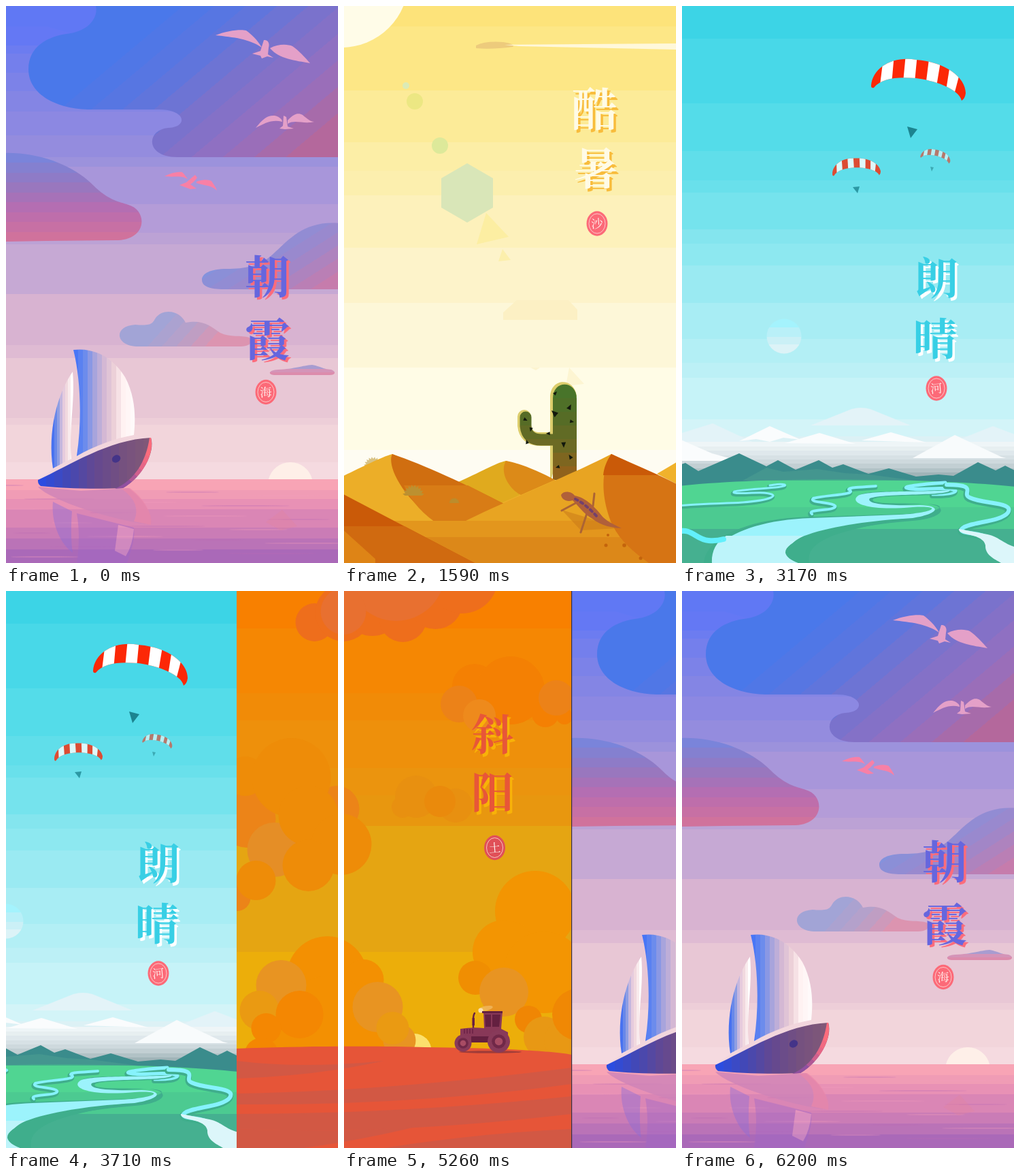
Recreate the animation shown at these times as an HTML page. Size 488 by 818 pixels, loop 6.51 s.

```html
<!DOCTYPE html>
<html lang="zh">
<head>
<meta charset="utf-8">
<title>朝霞 酷暑 朗晴 斜阳</title>
<style>
html, body { margin: 0; width: 100%; height: 100%; overflow: hidden; background: #332a3c; }
svg { display: block; width: 100vw; height: 100vh; }
text { font-family: "Noto Serif CJK SC", "Noto Sans CJK SC", "Noto Sans CJK", serif; text-anchor: middle; }
</style>
</head>
<body>
<svg id="stage" viewBox="0 0 488 818"></svg>
<script>
const WIDTH = 494, REST = 3.5, LOOP = 6510;

// ---------- drawing helpers ----------
const path = (d, fill, extra = '') => `<path d="${d}" fill="${fill}" ${extra}/>`;
const poly = (points, fill, extra = '') => `<polygon points="${points}" fill="${fill}" ${extra}/>`;
const rect = (x, y, w, h, fill) => `<rect x="${x}" y="${y}" width="${w}" height="${h}" fill="${fill}"/>`;
const oval = (x, y, rx, ry, fill, extra = '') =>
  `<ellipse cx="${x}" cy="${y}" rx="${rx}" ry="${ry}" fill="${fill}" ${extra}/>`;
const dot = (x, y, r, fill) => oval(x, y, r, r, fill);
const dots = (fill, list) => list.map(([x, y, r]) => dot(x, y, r, fill)).join('');
const line = (d, color, width, extra = '') =>
  `<path d="${d}" fill="none" stroke="${color}" stroke-width="${width}" stroke-linecap="round" ${extra}/>`;
const shift = (x, body) => `<g transform="translate(${x})">${body}</g>`;

// Flat horizontal stripes: each entry is [top, colour] and reaches down to the next.
const bands = (x, list, bottom) => list.map(([y, color], i) =>
  rect(x, y, WIDTH, (i + 1 < list.length ? list[i + 1][0] : bottom) - y, color)).join('');

function mix(colors, t) {
  const p = t * (colors.length - 1), i = Math.min(Math.floor(p), colors.length - 2);
  const channel = (c, k) => parseInt(c.slice(1 + 2 * k, 3 + 2 * k), 16);
  return `rgb(${[0, 1, 2].map(k => Math.round(
    channel(colors[i], k) + (channel(colors[i + 1], k) - channel(colors[i], k)) * (p - i)))})`;
}

// Linear gradient made of n hard steps.
function stepped(id, [x1, y1, x2, y2], colors, n) {
  let stops = '';
  for (let i = 0; i < n; i++) {
    const c = mix(colors, i / (n - 1));
    stops += `<stop offset="${i / n}" stop-color="${c}"/><stop offset="${(i + 1) / n}" stop-color="${c}"/>`;
  }
  return `<linearGradient id="${id}" gradientUnits="userSpaceOnUse" x1="${x1}" y1="${y1}" x2="${x2}" y2="${y2}">${stops}</linearGradient>`;
}

function glyph(char, x, y, size, color, shadow) {
  const at = (d, fill) => `<text x="${x + d}" y="${y + d + size * .375}" font-size="${size}" font-weight="900" fill="${fill}">${char}</text>`;
  return at(3.5, shadow) + at(0, color);
}

const seal = (char, x, y, color = '#fc6a78') =>
  oval(x, y, 15.5, 18.2, color) +
  oval(x, y, 12, 14.5, 'none', 'stroke="#fde0dc" stroke-width=".8"') +
  `<text x="${x}" y="${y + 6.5}" font-size="17.5" font-weight="300" fill="#fff4f0" transform="rotate(-5 ${x} ${y})">${char}</text>`;

// ---------- dawn at sea ----------
function dawn() {
  const sky = [[0, '#6478f4'], [58, '#6c7cf0'], [70, '#747fec'], [98, '#7c82e8'], [125, '#8485e4'],
    [155, '#8c88e2'], [190, '#948cde'], [222, '#9c92dc'], [236, '#a896da'], [291, '#b49cd8'],
    [333, '#bca2d5'], [350, '#c6a9d4'], [423, '#d8b3d1'], [498, '#dfbbd3'], [517, '#e8c7d5'],
    [605, '#edced8'], [615, '#f2d5db'], [670, '#f5dae0']];
  const sea = [[695, '#f8a4b5'], [711, '#f09cb5'], [724, '#e891b5'], [739, '#da86b5'],
    [766, '#ca7cb6'], [782, '#ba73b7'], [798, '#aa69b8']];
  const defs =
    stepped('cloudA', [190, 20, 400, 270], ['#4a78ea', '#5a76e0', '#7a72cc', '#9470c0', '#b4689c'], 11) +
    stepped('cloudB', [0, 216, 0, 346], ['#7a84da', '#9478c0', '#b86cb0', '#d0729c'], 9) +
    stepped('cloudC', [370, 330, 440, 440], ['#8492dc', '#9c88cc', '#c67cac'], 8) +
    stepped('cloudD', [230, 452, 300, 515], ['#a2a4d6', '#b8a0c8', '#dc94b0'], 6) +
    stepped('cloudE', [0, 528, 0, 543], ['#a89cd0', '#d494b8', '#dc8cac'], 3) +
    stepped('hull', [47, 0, 214, 0], ['#2c4ce0', '#4448b4', '#644890', '#745080', '#805878'], 14) +
    stepped('bow', [176, 706, 212, 650], ['#9050a0', '#e06488', '#fc6c7c'], 6) +
    stepped('sail', [99, 0, 190, 0], ['#4876f6', '#6c8cec', '#a8a4dc', '#d4b8d4', '#ecd0d8', '#fff2f2', '#fffafa'], 13) +
    stepped('jib', [67, 0, 99, 0], ['#4872f0', '#8098e4', '#e0c4dc', '#f4dce0', '#ffffff'], 8);

  const clouds =
    path('M132 0C136 18 120 36 95 40C60 44 33 60 33 93C33 130 75 152 125 152H225C265 152 268 178 238 179C206 182 204 222 252 222H492V0Z', 'url(#cloudA)') +
    path('M-5 216C50 214 100 235 128 263C150 285 165 287 180 292C208 300 208 342 165 344L60 345L-5 346Z', 'url(#cloudB)') +
    path('M492 319C440 314 417 342 397 360C375 383 350 386 325 386C300 386 288 393 288 402C288 412 300 416 320 416H492Z', 'url(#cloudC)') +
    path('M195 500C160 500 157 470 190 468C215 470 215 466 220 458C230 444 255 446 264 465C290 460 300 470 315 480C330 487 345 483 358 487C362 494 360 499 345 500Z', 'url(#cloudD)') +
    path('M394 542C385 541 385 535 400 534C425 533 435 528 450 527C465 530 465 533 478 534C486 537 484 542 476 542Z', 'url(#cloudE)');

  const birds =
    path('M308 43C325 36 345 34 353 36C360 41 370 50 376 61C357 48 335 46 308 43ZM379 50C385 49 388 55 386 61L385 71L393 76L384 74L376 77L374 73L362 70L374 66ZM388 62C400 55 415 56 421 59C430 65 440 76 447 84C425 80 402 78 388 62Z', '#e4a0c8') +
    path('M367 179C378 165 385 160 395 161C403 163 406 167 406 170C392 166 380 172 367 179ZM408 161L412 163L414 177L423 180L410 181L402 180L407 176ZM414 168C424 157 430 157 436 160C443 166 448 170 453 170C437 174 425 166 414 173Z', '#e4a0c8') +
    path('M233 250C243 245 252 243 259 244C263 248 265 251 267 254C256 248 248 252 233 250ZM278 248L281 252Q276 259 271 262L280 268L271 269L255 263L265 259ZM280 258C290 254 297 255 302 257C306 263 309 267 310 271C302 263 292 264 280 260Z', '#f880a6');

  const reflection = `<g opacity=".42">` +
    path('M69 728L97 742C95 770 96 790 98 803C80 790 66 760 69 728Z', '#8c6cd8') +
    path('M104 745L188 766C190 782 184 800 178 818H104Q110 780 104 745Z', '#a068c8') +
    path('M165 762L188 768Q186 792 176 808L160 800Z', '#f0a8cc') + '</g>' +
    path('M47 706C60 722 140 752 213 762C216 746 200 722 180 708L110 712Z', '#cf84b8', 'opacity=".8"') +
    path('M170 709L182 708C202 722 216 746 213 762L188 757Q200 730 170 709Z', '#ec88a8', 'opacity=".7"');

  let ripples = '';
  for (let i = 0; i < 22; i++) {
    const y = 704 + i * 5, x = (i * 137) % 470;
    ripples += oval(x, y, 26 + (i * 29) % 45, 1, i % 2 ? '#f09cb8' : '#b86cb4', 'opacity=".3"');
  }

  const boat =
    path('M52 692C95 662 150 637 188 630L213 634L130 672Z', '#f2d6dd') +
    path('M98 537C75 570 61 625 69 679L96 665C92 620 102 580 98 537Z', 'url(#jib)') +
    path('M99 505C130 501 158 517 175 545C192 577 190 610 188 630C160 635 130 646 104 661C113 600 108 540 99 505Z', 'url(#sail)') +
    path('M47 696C95 674 150 637 213 634C220 655 200 692 172 708C130 710 80 708 51 705Q46 701 47 696Z', 'url(#hull)') +
    path('M213 634C219 658 200 692 172 708L160 709C190 696 206 668 211 634Z', 'url(#bow)') +
    oval(162, 665, 6.5, 5.3, '#443488', 'transform="rotate(-30 162 665)"');

  return `<defs>${defs}</defs>` + shift(4,
    bands(-4, sky, 695) + path('M-5 0H132C136 18 120 36 95 40L60 30H-5Z', '#5c78f4', 'opacity=".45"') +
    clouds + birds + path('M386 695A33 33 0 0 1 450 695Z', '#feefe8') + bands(-4, sea, 818) +
    ripples + poly('382,758 406,740 428,764 404,770', '#e48098', 'opacity=".3"') +
    reflection + boat +
    glyph('朝', 384, 397, 66, '#6666de', '#fc6c7c') + glyph('霞', 384, 489, 66, '#6666de', '#fc6c7c') +
    seal('海', 382, 567));
}

// ---------- desert heat ----------
function bush(x, y, r, color) {
  let points = '';
  for (let i = 0; i <= 20; i++) {
    const a = Math.PI * (1 + i / 20), k = i % 2 ? r : r * .78;
    points += `${x + k * Math.cos(a)},${y + k * Math.sin(a)} `;
  }
  return poly(points, color);
}

function desert() {
  const sky = [[0, '#fde37a'], [30, '#fde786'], [124, '#fceb98'], [200, '#fceea6'], [242, '#fcefae'],
    [278, '#fdf1bb'], [355, '#fdf3ca'], [436, '#fdf7d8'], [531, '#fffce6'], [652, '#fefcf2']];
  const spikes = [[112, 599, 5], [133, 590, 4], [136, 610, 3], [125, 643, 4], [117, 677, 3], [135, 663, 3.5],
    [112, 569, 3], [68, 607, 3], [77, 621, 3], [103, 628, 3], [71, 641, 3]];
  const arm = 'M69 604V617Q71 637 92 637H114';

  const flares = dot(310, 117, 5, '#dcebb6') + dot(323, 140, 12, '#ece783') + dot(360, 205, 12, '#dde99a') +
    poly('400,231 438,253 438,296 400,318 362,296 362,253', '#d9e6b8') +
    poly('428,304 461,339 414,350', '#fceea2') + poly('452,357 464,373 446,375', '#fcefac');

  const dunes =
    bush(-155, 676, 14, '#d8c284') +
    path('M-203 692C-175 679 -145 663 -127 658C-80 678 -20 704 0 712L40 668C60 674 90 690 112 696L300 818H-203Z', '#ecae28') +
    path('M-30 699C0 686 25 671 40 668L60 718L10 740Z', '#e0aa1e') +
    path('M40 668C30 685 45 710 62 718L112 696C90 684 60 671 40 668Z', '#dc8a18') +
    path('M-127 658C-135 672 -118 722 -45 770C-20 757 20 742 39 732C-20 702 -80 674 -127 658Z', '#d06e10') +
    path('M-110 704H-16L39 732L-45 770Q-92 744 -110 704Z', '#d87c16') +
    path('M-45 770C10 738 130 692 195 658L291 710V818H-203V760Z', '#e8a422') +
    rect(-203, 756, 494, 24, '#e3961d') + rect(-203, 780, 494, 38, '#dc8819') +
    path('M-203 715L-6 818H-203Z', '#ca5a08') + path('M-203 764H-109L-6 818H-203Z', '#d06a10') +
    path('M-203 766L-152 812V818H-203Z', '#de8416') +
    poly('262,687 291,670 291,702', '#f0b22c') +
    path('M195 658C184 675 178 705 190 745C200 780 225 800 250 818H291V702C260 686 230 674 195 658Z', '#d67414') +
    path('M195 658C188 668 184 678 183 689H264C240 678 220 670 195 658Z', '#ca5a08') +
    bush(-96, 719, 16, '#bc9030') + bush(-36, 730, 8, '#bc8c2c');

  const lizard =
    path('M122 740Q165 752 205 767L150 770Z', '#c87818', 'opacity=".5"') +
    line('M150 726L122 741M160 742L150 773M168 734L170 716M176 746L190 762', '#ac6434', 3) +
    path('M121 718C125 711 137 713 141 719C158 722 172 737 182 750C190 758 200 762 210 767C192 766 178 762 167 753C154 746 146 733 138 726C130 729 122 725 121 718Z', '#b0603a') +
    line('M142 724Q158 732 174 750', '#74406c', 4, 'stroke-dasharray="4 5"');

  const steps = dots('#c4640c', [[187, 792, 2.5], [214, 792, 2.8], [238, 811, 2.5], [190, 777, 2]]);

  const cactus =
    path('M105 700V575C105 545 141 545 144 573L135 600Z', '#dccd6c') +
    line(arm, '#dccd6c', 20, 'transform="translate(-2 -1)"') +
    `<g stroke="url(#cactus)">${line(arm, 'url(#cactus)', 17)}</g>` +
    path('M109 696V576C109 549 144 549 144 577V696Z', 'url(#cactus)') +
    spikes.map(([x, y, r], i) =>
      poly(`${-r},${-r} ${r},${-r * .3} ${-r * .1},${r}`, '#12180c', `transform="translate(${x} ${y}) rotate(${i * 75})"`)).join('');

  return `<defs>${stepped('cactus', [0, 556, 0, 696], ['#48742a', '#566c26', '#6c6a24', '#90621c'], 7)}</defs>` +
    bands(0, sky, 818) + dot(1, -38, 99, '#fffce8') + shift(-214, flares) + shift(203,
    path('M-4 58Q10 51 36 53Q55 56 50 60Q20 64 -4 62Z', '#edcb7c') +
    poly('38,57 291,55 291,64 60,59', '#fff8da') +
    poly('36,450 56,432 132,432 145,446 145,461 36,461', '#fcf0c4') +
    poly('133,531 155,555 128,558', '#fdf5d2') + poly('76,531 90,531 84,535', '#fcf4d0') +
    cactus + dunes + lizard + steps +
    glyph('酷', 170, 151, 67, '#fffbe6', '#f8bc3c') + glyph('暑', 172, 238, 64, '#fffbe6', '#f8bc3c') +
    seal('沙', 174, 319.5));
}

// ---------- clear river plain ----------
function plain() {
  const sky = [[0, '#3cd4e6'], [48, '#48d8e8'], [143, '#54dce9'], [213, '#60deea'], [256, '#69e0eb'],
    [274, '#75e3ed'], [328, '#84e5ee'], [349, '#8de8f0'], [381, '#9aeaf2'], [436, '#a8edf4'],
    [489, '#b3eff5'], [524, '#bcf0f6'], [546, '#c6f3f8'], [607, '#d3f4f8'], [632, '#dcf1f5']];
  const canopy = 'M279 117C281 90 312 73 345 79C388 82 418 105 418 128Q417 136 412 139C408 121 370 109 345 106C315 104 295 106 283 120Q279 121 279 117Z';
  const chute =
    path(canopy, '#fc2806') +
    `<g clip-path="url(#canopy)">` +
    poly('297,76 313,70 309,116 292,116', '#fff') + poly('330,70 347,70 343,112 326,112', '#fff') +
    poly('365,70 382,76 375,118 359,118', '#fff') + poly('396,80 411,92 401,130 389,124', '#fff') + '</g>';
  const copy = (x, y, scale, angle, opacity) =>
    `<g transform="translate(${x} ${y}) rotate(${angle}) scale(${scale}) translate(-348 -106)" opacity="${opacity}">${chute}</g>`;

  const moon = `<g clip-path="url(#moon)">` + rect(125, 459, 52, 13, '#a4f3fd') + rect(125, 472, 52, 14, '#b9f0f8') +
    rect(125, 486, 52, 11, '#cbf0f6') + rect(125, 497, 52, 14, '#dcf3f7') + '</g>';

  const peaks =
    path('M190 616L250 592Q264 588 278 592L337 616Z', '#e3f3f8') +
    poly('-5,629 46,613 115,645 115,690 -5,690', '#e3f3f8') + poly('400,640 458,617 492,630 492,690 400,690', '#e3f3f8') +
    rect(-4, 640, 494, 60, 'url(#mist)') +
    poly('-5,635 45,657 85,668 -5,668', '#fafcfd') + poly('85,639 130,617 176,637 150,634 130,640 110,636', '#fafcfd') +
    poly('152,642 203,627 256,643', '#fafcfd') + poly('265,638 308,626 360,641', '#fafcfd') +
    poly('340,664 402,630 470,662 492,668 492,680 340,680', '#f8fbfc') +
    rect(330, 664, 162, 30, 'url(#mist)') +
    poly('-5,675 6,671 25,683 85,657 125,676 142,667 168,681 202,667 222,678 238,673 275,687 305,679 345,691 378,688 400,690 436,670 462,682 476,675 492,683 492,715 -5,715', '#3a8c8c') +
    poly('90,697 125,678 150,684 200,680 240,686 275,688 345,697', '#44968f');

  const edge = '#3fae8c';
  const stream = (d, width) => line(d, edge, width + 3, 'transform="translate(-1 2)"') + line(d, '#86f2fc', width);
  const rivers =
    stream('M-5 734C40 730 60 731 90 729C130 726 150 718 122 715C105 714 70 718 78 713C90 709 160 708 152 703C145 701 138 703 130 704', 3) +
    stream('M192 746C182 738 230 742 226 734C222 728 186 730 194 723C210 718 262 718 246 710C245 707 270 706 286 705', 4) +
    stream('M388 700C300 706 330 711 365 709C420 706 410 718 370 717', 5) +
    path('M33 818C36 780 100 750 200 750L330 746C400 742 390 728 340 732C270 738 255 728 262 718C280 710 340 714 400 713C380 722 300 716 282 724C275 732 320 730 355 731C395 732 390 752 340 756C260 762 165 780 180 818Z', edge) +
    path('M45 818C42 785 100 755 190 752L320 747C376 744 384 733 340 736C275 742 245 730 260 719C275 711 350 714 395 711C395 720 300 715 277 723C270 732 310 734 350 733C385 734 378 746 340 752C250 757 150 775 153 803Q155 812 172 818Z', '#9cf3fc') +
    path('M45 818C44 800 52 786 66 778H180C155 790 150 805 172 818Z', '#bdf4fa') +
    path('M153 803C152 780 240 760 330 753C250 768 180 780 188 818H172Q155 812 153 803Z', edge) +
    stream('M390 703C440 703 410 716 424 722C445 732 490 728 480 744C470 758 420 758 412 768C408 776 440 772 452 782', 6) +
    path('M408 768C406 778 444 774 447 792C446 808 465 814 470 818H492V795C470 788 468 780 450 776Z', '#dcf6fa') +
    line('M-5 772C15 766 22 784 40 785Q52 786 62 783', '#62f0fc', 8);

  const defs = `<clipPath id="canopy"><path d="${canopy}"/></clipPath>` +
    '<clipPath id="moon"><circle cx="151" cy="485" r="25.5"/></clipPath>' +
    stepped('mist', [0, 640, 0, 692], ['#eef5f7', '#dde6ea', '#c8d4d8', '#a0b4b8'], 8);

  return `<defs>${defs}</defs>` + shift(4,
    bands(-4, sky, 818) + moon + chute + copy(256, 237, .51, -9, .8) + copy(373.5, 219.5, .32, 4, .55) +
    poly('332,177 347,181 337,194', '#1c8490') + poly('252,266 262,265 259,275', '#2c98a4') +
    poly('366,236 371,237 368,243', '#3caab4') + peaks +
    `<g clip-path="url(#ground)">${bands(-4, [[690, '#44b08e'], [697, '#50d592'], [736, '#4cca91'], [768, '#45b090']], 818)}</g>` +
    '<clipPath id="ground"><path d="M-5 705C80 696 200 694 300 696C400 698 450 702 492 706V818H-5Z"/></clipPath>' +
    rivers +
    glyph('朗', 375, 399, 64, '#38cfe5', '#fff') + glyph('晴', 373, 488, 64, '#38cfe5', '#fff') +
    seal('河', 375, 561.5));
}

// ---------- field at sunset ----------
function sunset() {
  const sky = [[0, '#f88000'], [55, '#f58703'], [150, '#f18b07'], [190, '#ee900b'], [260, '#eb940e'],
    [300, '#e8970f'], [345, '#e5a512'], [530, '#ecae0a']];
  const leftClouds =
    dots('#ee6e1c', [[214, 46, 28], [257, 32, 42], [300, 20, 46], [345, 40, 35], [393, 16, 40], [432, -20, 53]]) +
    dot(335, -28, 72, '#e87030') + dot(257, 30, 34, '#e87030') +
    dots('#ec8418', [[115, 335, 42], [247, 320, 34], [100, 450, 20]]) + dot(155, 380, 40, '#e58e26') +
    dots('#ee8c08', [[112, 272, 29], [180, 274, 58], [205, 330, 44], [254, 372, 45], [205, 403, 38], [128, 425, 29]]) +
    dot(362, 675, 25, '#fce06c') +
    dots('#f39002', [[233, 567, 60], [287, 571, 30], [235, 640, 75]]) + rect(140, 600, 195, 80, '#f39002') +
    dots('#e89422', [[165, 579, 37], [308, 611, 37], [340, 660, 24]]) +
    dots('#ea9a12', [[133, 616, 29], [330, 642, 24]]) +
    dots('#f48702', [[192, 622, 35], [143, 642, 22], [136, 681, 25]]);
  const rightClouds =
    dots('#f48003', [[193, 140, 33], [246, 146, 50], [297, 180, 20], [325, 184, 12]]) +
    dots('#ec8218', [[170, 166, 27], [313, 157, 26]]) + dot(200, 183, 24, '#ee8a1c') +
    dots('#e89010', [[87, 317, 16], [107, 302, 31], [165, 315, 25]]) + dot(142, 309, 23, '#ea8a0c') +
    dots('#f39502', [[282, 470, 59], [237, 530, 47], [295, 560, 60]]) +
    dot(194, 568, 25, '#f08e02') + dot(236, 589, 36, '#e89422') +
    dot(272, 629, 20, '#f08604') + dots('#e89814', [[295, 655, 30], [325, 660, 30]]) + dot(345, 622, 38, '#f08804');

  const soil = path('M-158 672C-50 668 60 668 120 670C200 671 300 674 336 681V818H-158Z', '#e65538') +
    `<g fill="#bc5c54" opacity=".45"><path d="M-158 690Q-60 702 60 690Q-40 712 -158 716Z"/>
    <path d="M-158 738Q60 735 336 700V724Q100 756 -158 754Z"/><path d="M-158 768Q80 768 336 742V768Q60 800 -158 790Z"/>
    <path d="M-158 790Q0 796 110 786Q30 806 -60 818H-158Z"/><path d="M60 818Q200 796 336 790V818Z"/></g>`;

  const wheel = (x, y, r) => dot(x, y, r, '#883a5a') + dot(x, y, r * .62, '#702848') + dot(x, y, r * .35, '#a84c64');
  const tractor = oval(216, 677, 46, 1.8, '#a03c38') +
    oval(209, 613, 11, 3.5, '#f0b860', 'opacity=".8" transform="rotate(-12 209 613)"') + dot(202, 616, 3.5, '#fae0b0') +
    line('M191 643V629Q191 623 193 620', '#682044', 2.4) + rect(189.5, 627, 3.5, 11, '#682044') +
    path('M206 618L234 617L232 643L242 648V660H180L172 654V643Q190 640 207 642Z', '#883858') +
    path('M204 617H234V620H204ZM208 622H217V640H209ZM219 622H231L229 640H219Z', '#642040') +
    path('M178 643V650M182 643V650M186 643V650M190 643V650', 'none', 'stroke="#682044" stroke-width="1.4"') +
    rect(188, 654, 26, 9, '#642040') + wheel(176, 664, 12.5) + wheel(228.5, 661.5, 16.5);

  return bands(0, sky, 818) + shift(-99.5, leftClouds) + shift(158, rightClouds + soil + tractor +
    glyph('斜', 219, 211, 62, '#e85638', '#f8b208') + glyph('阳', 219, 296, 62, '#e85638', '#f8b208') +
    seal('土', 222.5, 377, '#e05058'));
}

// ---------- panorama ----------
const scenes = [dawn, desert, plain, sunset];
const seam = x => rect(x - 1, 0, 1.2, 818, '#3a3040');
document.getElementById('stage').innerHTML =
  `<defs>${scenes.map((_, i) => `<clipPath id="frame${i}"><rect width="${WIDTH}" height="818"/></clipPath>`).join('')}</defs>
  <g id="strip">${scenes.map((draw, i) =>
    `<g transform="translate(${i * WIDTH})"><g id="scene${i}" clip-path="url(#frame${i})">${draw()}</g></g>`).join('')}
  <use href="#scene0" x="${4 * WIDTH}"/>${seam(WIDTH)}${seam(4 * WIDTH)}</g>`;

// Each slide is [start, end] in ms; the four eased moves add up.
const slides = [[0, 1468], [1526, 3130], [3125, 4693], [4645, 6265]];
const ease = t => (1 - Math.cos(Math.PI * Math.min(1, Math.max(0, t)))) / 2;
const panAt = t => REST + WIDTH * slides.reduce((sum, [a, b]) => sum + ease((t - a) / (b - a)), 0);

// The picture advances in evenly spaced runs of steps: [first, last, count].
const runs = [[90, 210, 2], [360, 790, 5], [940, 1060, 2], [1270, 1880, 7], [2000, 2230, 3], [2350, 2560, 3],
  [2680, 3170, 6], [3260, 3350, 2], [3500, 4130, 7], [4220, 4830, 7], [4940, 5260, 4], [5350, 5590, 3], [5680, 6200, 6]];
const ticks = [0, ...runs.flatMap(([a, b, n]) => Array.from({ length: n }, (_, i) => a + (b - a) * i / (n - 1)))];

const strip = document.getElementById('strip');
function render(now) {
  const time = now % LOOP;
  const tick = ticks.filter(t => t <= time).pop();
  strip.setAttribute('transform', `translate(${-Math.round(panAt(tick))})`);
}
function loop() {
  render(performance.now());
  requestAnimationFrame(loop);
}
loop();
</script>
</body>
</html>
```
